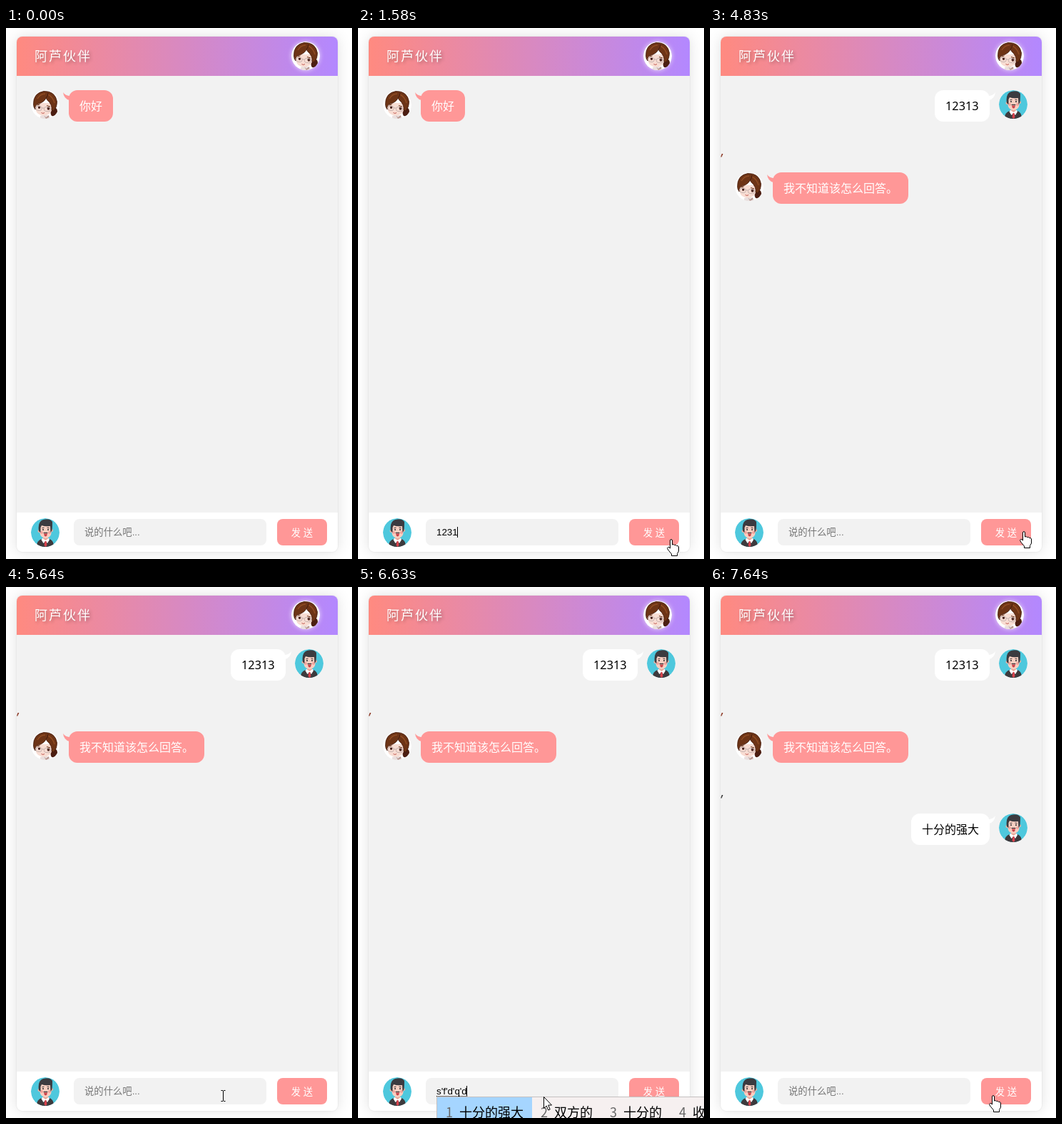
These frames come from a looping animation (485x743 px, 8 s). An HTML page:

```html
<!DOCTYPE html>
<html lang="zh-CN">
<head>
<meta charset="utf-8">
<title>Chat</title>
<style>
html, body { margin: 0; width: 100%; height: 100%; overflow: hidden; background: #fff; }
.card { position: absolute; left: 15px; top: 12px; width: 450px; height: 721px; border-radius: 8px; overflow: hidden;
  background: #f2f2f2; box-shadow: 0 0 20px rgba(0,0,0,.12), 0 0 2px rgba(0,0,0,.12); }
.head { height: 55px; background: linear-gradient(90deg, #ff8a80, #b388ff); }
.foot { position: absolute; bottom: 0; width: 100%; height: 55px; background: #fff; }
svg { position: absolute; left: 0; top: 0; }
text { font: 16px "Noto Sans CJK SC", "Noto Sans CJK", sans-serif; white-space: pre; }
.title { font-size: 18px; letter-spacing: 2px; fill: #fff; text-shadow: 2px 2px 4px rgba(0,0,0,.3); }
.bot { font-weight: 500; fill: #fff; }
.num { font-family: "Noto Sans", "Noto Sans CJK SC", sans-serif; font-size: 16.3px; }
.field { font: 13.333px "Liberation Sans", "Noto Sans CJK SC", "Noto Sans CJK", sans-serif; }
.cand { font-size: 18px; }
.glow { filter: drop-shadow(0 0 3px rgba(255,255,255,.7)); }
</style>
</head>
<body>
<div class="card"><div class="head"></div><div class="foot"></div></div>
<svg width="485" height="743" viewBox="0 0 485 743">
  <defs>
    <clipPath id="round"><circle cx="20" cy="20" r="20"/></clipPath>
    <g id="girl" clip-path="url(#round)">
      <circle cx="20" cy="20" r="20" fill="#fff"/>
      <path d="M29 25q8-2 8 5q-2 7-8 6q-3-4 0-11z" fill="#4c1e12"/>
      <path d="M13 36l6-2 7 2 1 4H13z" fill="#e9dfde"/>
      <path d="M18 35l3 3 4-3v3l-4 2z" fill="#b99791"/>
      <path d="M6 18Q5 29 10 33Q18 38 26 33Q31 28 30 18z" fill="#f8ddd3"/>
      <path d="M3.500 20Q3 4 18 1.500Q34 1 36.500 16Q37 23 32 29L29 28Q30 20 23 14L21 11Q19 17 8 20Q5 23 6 27Q3.500 24 3.500 20z" fill="#6d3416" stroke="#421a0c" stroke-width=".8"/>
      <path d="M9 12Q13 5 20 5M24 6Q31 10 33 18" fill="none" stroke="#8f4b22" stroke-width="1.500"/>
      <path d="M21 11Q24 8 24 4" fill="none" stroke="#421a0c"/>
      <g fill="#4f2a24"><ellipse cx="11.500" cy="24" rx="1.700" ry="2"/><ellipse cx="24.500" cy="25.500" rx="1.900" ry="2.200"/></g>
      <path d="M8.500 21l4-1M22 21.500l5 1.500" stroke="#6d3416"/>
      <g fill="none" stroke="#c3b0ad" stroke-width=".9" transform="rotate(6 17 26)"><rect x="7" y="23" width="8" height="6" rx="2.500"/><rect x="18.500" y="23" width="9" height="6" rx="2.500"/><path d="M15 25h3.500"/></g>
      <path d="M14.500 31.500q2.500 2 4.500 0" fill="none" stroke="#c0574f"/>
    </g>
    <g id="man" clip-path="url(#round)">
      <circle cx="20" cy="20" r="20" fill="#4ec8dd"/>
      <path d="M8 40q0-9 7-11h11q6 2 6 11z" fill="#3d3a3d"/>
      <path d="M16 28h9l1 2-3 5-2.500-3-3 3-3-5z" fill="#fff"/>
      <path d="M17 24h7v4.500l-3.500 2.500-3.500-2.500z" fill="#e9ab9c"/>
      <path d="M19.500 32h2l1 6-2 2-2-2z" fill="#d8434d"/>
      <circle cx="11.500" cy="18" r="2" fill="#eeb5a5"/><circle cx="29" cy="17" r="2" fill="#eeb5a5"/>
      <path d="M12.500 9h16v12q-1 6-8 7q-7-1-8-7z" fill="#f8cfc1"/>
      <circle cx="15" cy="20" r="2" fill="#f2a59d"/><circle cx="26" cy="20" r="2" fill="#f2a59d"/>
      <path d="M11 18Q9 5 17 2Q27-.5 30 5Q30 11 29.500 17L27.500 20L27 11Q20 12 15 10L13.500 13V20z" fill="#3b3b40"/>
      <g fill="#302c30"><circle cx="17" cy="16" r="1.100"/><circle cx="24" cy="16" r="1.100"/><path d="M17 21q2-2 3.500-1q1.500-1 3.500 1z"/></g>
      <path d="M15.500 13.700l3-.5M22.500 13.200l3 .5" stroke="#3b3b40"/>
      <path d="M18 21.500h5q-.5 4-2.500 4t-2.500-4z" fill="#c9434a"/>
    </g>
    <path id="tail" d="M0 0Q1 9 9 11V5Q3 4.500 0 0z"/>
    <path id="comma" d="M1.500 0h1.800l-2 4.500h-1.300z"/>
    <path id="hand" d="M4.500 13V2Q4.700.6 6 .6T7.500 2V8Q9.500 7 10.500 8.500Q12.500 7.700 13.500 9.500Q16 9 16.500 11V17L14.500 20.500V23.500H6.500V21L1.500 15Q-.2 12 1.500 11.500Q3 11 4.500 13z" fill="#fff" stroke="#000" stroke-linejoin="round"/>
    <path id="beam" d="M-3 -7.500H-.5M.5 -7.500H3M0 -7V7M-3 7.500H-.5M.5 7.500H3" stroke="#000" fill="none"/>
    <path id="arrow" d="M.5.500V16.500L4.200 13L6.800 19L9.200 18L6.700 12H11.500z" fill="#fff" stroke="#000"/>
  </defs>

  <text class="title" x="40" y="46">阿芦伙伴</text>
  <g class="glow"><use href="#girl" x="400" y="19"/></g>
  <g id="list"></g>

  <use href="#man" x="35" y="686"/>
  <rect x="95" y="687" width="270" height="37" rx="8" fill="#f2f2f2"/>
  <rect x="380" y="687" width="70" height="37" rx="8" fill="#ff9797"/>
  <text class="field" x="399.800" y="711" fill="#fff">发 送</text>
  <text class="field" id="hint" x="110" y="710" fill="#757575">说的什么吧...</text>
  <text class="field" id="typed" x="110" y="710"></text>
  <line id="under" x1="110" y1="712.500" y2="712.500" stroke="#000" stroke-dasharray="1 1"/>
  <rect id="caret" y="698" width="1" height="15"/>
  <g id="popup"></g>
  <use id="mouse"/>
</svg>
<script>
const LOOP = 8000;
const $ = id => document.getElementById(id);
const show = (el, on) => el.style.display = on ? '' : 'none';
const at = (rows, t) => rows.findLast(r => r[0] <= t);

// [start, end, top, mine, bubble width, text, time the tail appears]
const messages = [
  [0, 2170, 87, false, 62, '你好', 0],
  [2170, LOOP, 87, true, 77, '12313', 4830],
  [4830, LOOP, 202, false, 190, '我不知道该怎么回答。', 4830],
  [7640, LOOP, 317, true, 110, '十分的强大', 7640]
];
// [time, top, colour]
const commas = [[4830, 176, '#8a3520'], [7640, 291, '#333']];

// [time, text, caret, composing]
const typing = [
  [0, '', 0], [460, '', 1], [980, '', 0],
  [1260, '1', 1], [1390, '12', 1], [1520, '123', 1], [1580, '1231', 1], [1650, '12313', 1],
  [2100, '', 0], [5900, '', 1],
  [6300, 's', 1, 1], [6390, "s'f", 1, 1], [6510, "s'f'd", 1, 1], [6630, "s'f'd'q'd", 1, 1],
  [6830, '十分的强大', 1], [7360, '十分的强大', 0], [7640, '', 0]
];
const choices = [
  [0, ''], [6390, '是否 身份 十分 双方 收费'], [6510, '十分的 双方的 身份的 收'],
  [6630, '十分的强大 双方的 十分的 收'], [6830, '']
];
// [time, shape, x, y]
const pointer = [
  [0, ''], [120, 'arrow', 294, 727], [190, 'beam', 254.5, 718], [260, 'beam', 235.5, 716],
  [460, 'beam', 239.5, 718], [580, 'beam', 241.5, 719],
  [1330, 'beam', 272.5, 717], [1390, 'beam', 330.5, 716], [1450, 'hand', 392, 715],
  [1520, 'hand', 425, 716], [1580, 'hand', 433, 715], [1780, 'hand', 442, 714],
  [1850, 'hand', 440, 711], [1910, 'hand', 436, 707], [2040, 'hand', 434, 704],
  [5370, 'hand', 424, 704], [5440, 'hand', 394, 705], [5510, 'beam', 350.5, 709],
  [5580, 'beam', 304.5, 712], [5650, 'beam', 274.5, 713], [5720, 'beam', 261.5, 714],
  [6390, 'arrow', 260, 713], [6830, 'beam', 261.5, 714],
  [6970, 'beam', 272.5, 713], [7040, 'beam', 306.5, 711], [7110, 'beam', 346.5, 710],
  [7180, 'arrow', 370, 710], [7250, 'hand', 384, 711], [7320, 'hand', 391, 711]
];

function addMessage([from, to, top, mine, width, text, tailFrom]) {
  const x = mine ? 392 - width : 88;
  const fill = mine ? '#fff' : '#ff9797';
  const place = mine ? `translate(400 ${top + 3}) scale(-1 1)` : `translate(80 ${top + 3})`;
  const kind = mine ? (/\d/.test(text) ? 'num' : '') : 'bot';
  const g = document.createElementNS('http://www.w3.org/2000/svg', 'g');
  g.innerHTML = `<use href="#${mine ? 'man' : 'girl'}" x="${mine ? 405 : 35}" y="${top}"/>
    <use class="tail" href="#tail" transform="${place}" fill="${fill}"/>
    <rect x="${x}" y="${top}" width="${width}" height="44" rx="12" fill="${fill}"/>
    <text class="${kind}" x="${x + 15}" y="${top + 28}">${text}</text>`;
  $('list').append(g);
  const tail = g.querySelector('.tail');
  return t => {
    show(g, t >= from && t < to);
    show(tail, t >= tailFrom);
  };
}

function addComma([from, top, fill]) {
  const use = document.createElementNS('http://www.w3.org/2000/svg', 'use');
  use.setAttribute('href', '#comma');
  use.setAttribute('transform', `translate(15 ${top})`);
  use.setAttribute('fill', fill);
  $('list').append(use);
  return t => show(use, t >= from);
}

function drawPopup(words) {
  if (!words) return '';
  let x = 111;
  let out = '<rect x="110.500" y="713.500" width="400" height="40" fill="#f6f0f0" stroke="#c4c0c0"/>';
  words.split(' ').forEach((word, i) => {
    const width = 43 + 18 * word.length;
    if (!i) out += `<rect x="111" y="714" width="${width}" height="30" fill="#a5d5ff"/>`;
    out += `<text class="cand" x="${x + 12}" y="742" fill="#666">${i + 1}</text>
      <text class="cand" x="${x + 31}" y="742">${word}</text>`;
    x += width;
  });
  return out;
}

const parts = [...messages.map(addMessage), ...commas.map(addComma)];
let lastWords = null;

function draw(t) {
  parts.forEach(update => update(t));

  const [, text, caret, composing] = at(typing, t);
  $('typed').textContent = text;
  show($('hint'), !text);
  const end = Math.floor(110 + (text ? $('typed').getComputedTextLength() : 0));
  $('caret').setAttribute('x', end);
  show($('caret'), caret);
  $('under').setAttribute('x2', end);
  show($('under'), composing);

  const words = at(choices, t)[1];
  if (words !== lastWords) $('popup').innerHTML = drawPopup(lastWords = words);

  const [, shape, x, y] = at(pointer, t);
  show($('mouse'), shape);
  if (shape) {
    $('mouse').setAttribute('href', '#' + shape);
    $('mouse').setAttribute('transform', `translate(${x} ${y})`);
  }
}

const start = performance.now();
function tick() {
  draw((performance.now() - start) % LOOP);
  requestAnimationFrame(tick);
}
tick();
</script>
</body>
</html>
```
